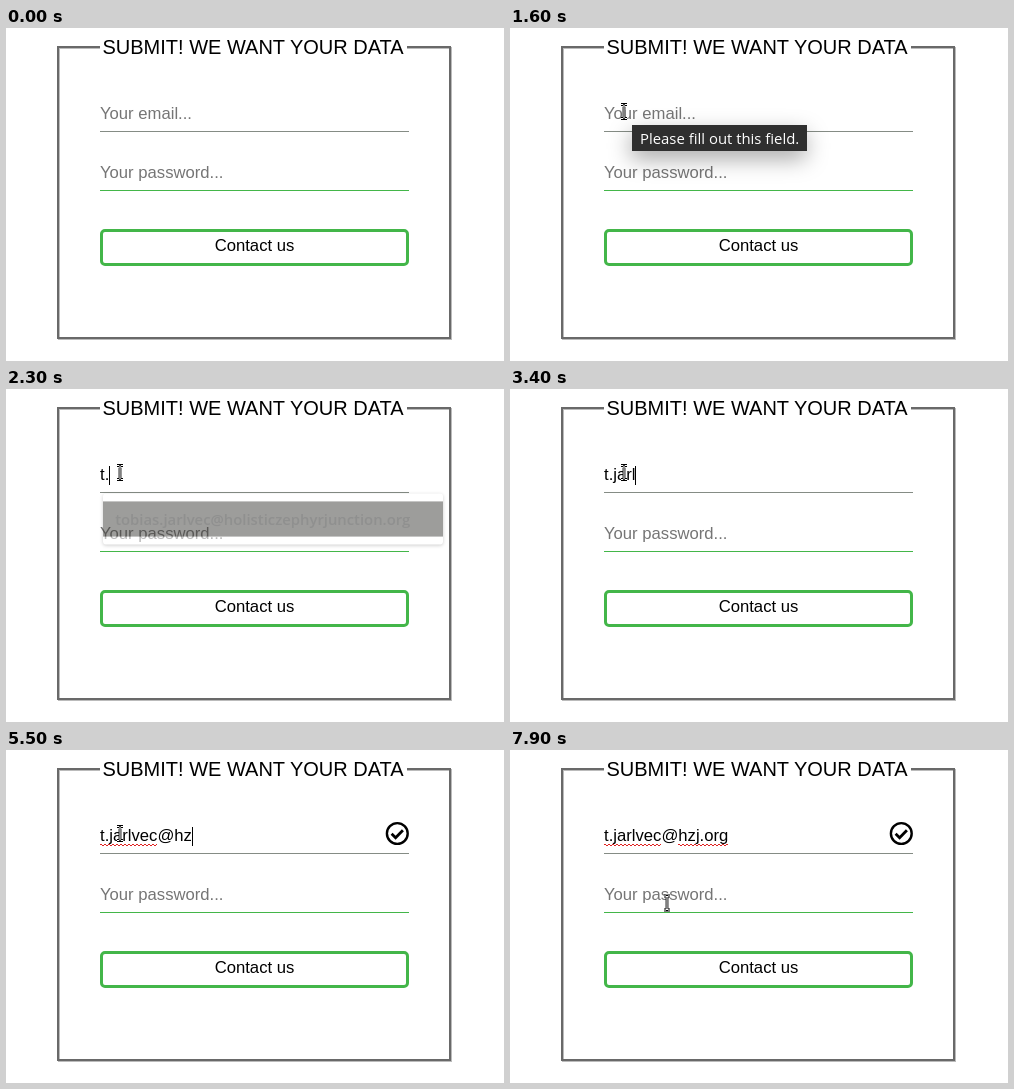
These frames come from a looping animation (498x333 px, 8000 ms). An HTML page:

```html
<!DOCTYPE html>
<html lang="en">
<head>
<meta charset="utf-8">
<title>Form demo</title>
<style>
  html, body { margin: 0; width: 100%; height: 100%; overflow: hidden; background: #fff; }
  #stage { position: relative; width: 498px; height: 333px; overflow: hidden; background: #fff;
    font: 16.667px/20px "Liberation Sans", Arial, sans-serif; color: #000; }
  #stage > * { position: absolute; box-sizing: border-box; white-space: nowrap; }
  .frame { left: 51px; top: 18px; width: 394px; height: 293px; border: 2px solid #696969;
    box-shadow: 1px 1px #bbb, inset 1px 1px #bbb; }
  .legend { left: 94px; top: 7px; width: 307px; padding-left: 2.5px; background: #fff;
    font-size: 20px; line-height: 24px; }
  .field { left: 94px; width: 309px; height: 28px; border-bottom: 1px solid #43b649; }
  .hint { color: #757575; }
  #email { top: 76px; border-color: #858c85; }
  #email .hint { position: absolute; left: 0; }
  #password { top: 135px; }
  .button { left: 94px; top: 201px; width: 309px; height: 37px; padding-top: 4px;
    border: 3px solid #43b649; border-radius: 5px; text-align: center; }
  #caret { position: absolute; top: 1px; width: 1px; height: 19px; background: #000; }
  .word { position: relative; }
  .bad::after { content: ""; position: absolute; left: 0; right: 0; bottom: -1px; height: 2px;
    background: linear-gradient(90deg, #e02020 50%, #0000 0) 0 0 / 4px 1px repeat-x,
                linear-gradient(90deg, #0000 50%, #e02020 0) 0 1px / 4px 1px repeat-x; }
  #tip { left: 122px; top: 97px; width: 175px; height: 26px; padding-left: 8px; background: #2f2f2f;
    color: #fff; font: 14.9px/26px "Open Sans", "Noto Sans", sans-serif;
    box-shadow: -1px 8px 22px rgba(0, 0, 0, .34); }
  #popup { left: 93px; top: 104px; width: 348px; padding: 8px 0; background: #fff;
    border-radius: 3px; box-shadow: 0 1px 4px rgba(0, 0, 0, .4); }
  #popup div { height: 36px; padding-left: 12.5px; background: #3e3d39; color: #222322;
    font: 600 15.2px/36px "Open Sans", "Noto Sans", sans-serif; }
  svg { left: 0; top: 0; overflow: visible; }
  [hidden] { display: none !important; }
</style>
</head>
<body>
<div id="stage">
  <div class="frame"></div>
  <div class="legend">SUBMIT! WE WANT YOUR DATA</div>
  <div class="field" id="email"><span class="hint" id="emailHint">Your email...</span><span class="word" id="user"></span><span id="at"></span><span class="word" id="domain"><span class="word" id="host"></span><span id="suffix"></span></span><span id="caret"></span></div>
  <div class="field hint" id="password">Your password...</div>
  <div class="button">Contact us</div>
  <svg id="check" width="498" height="333" fill="none" stroke="#000" stroke-width="2.4">
    <circle cx="391.3" cy="83.5" r="10.4"/>
    <path d="M385.6 83.8l4 4 7.3-7.5" stroke-width="2.8"/>
  </svg>
  <div id="tip">Please fill out this field.</div>
  <div id="popup">
    <div>tobias.jarlvec@holisticzephyrjunction.org</div>
    <div class="more">office@holisticzephyrjunction.org</div>
    <div class="more">mail@holisticzephyrjunction.org</div>
  </div>
  <svg id="pointer" width="20" height="20">
    <path id="arrow" d="M.5 .5v14l3.2-3 2.2 5 2.3-1-2.2-4.8h4.4z" fill="#fff" stroke="#000"/>
    <g id="beam" fill="none">
      <path d="M-3-7h2L0-6 1-7h2M0-6V6M-3 7h2L0 6 1 7h2" stroke="#000" stroke-width="2.8"/>
      <path d="M-3-7h2L0-6 1-7h2M0-6V6M-3 7h2L0 6 1 7h2" stroke="#fff" stroke-width="1"/>
    </g>
  </svg>
</div>
<script>
const LOOP = 8000, STEP = 100;
const ADDRESS = "t.jarlvec@hzj.org";
const KEY_TIMES = [2000, 2200, 3000, 3100, 3200, 3400, 3500, 3600, 3700,
                   4200, 4800, 5500, 5600, 6000, 6300, 6700, 6900];
const $ = id => document.getElementById(id);
const show = (el, on) => el.toggleAttribute("hidden", !on);
const within = (t, from, to) => t >= from && t < to;
const mix = (a, b, p) => a + (b - a) * p;

function pointerAt(t) {
  if (t < 7500) {
    const p = Math.min(1, (t - 600) / 600), e = 1 - (1 - p) ** 2;
    return [mix(0, 114, e), mix(39, 83.5, e)];
  }
  if (t < 7900) {
    const p = Math.min(1, (t - 7400) / 300);
    return [mix(114, 161, p), mix(83.5, 153, p)];
  }
  return [157, 153];
}

function drawPointer(t) {
  const [x, y] = pointerAt(t);
  const overField = x >= 94 && (within(y, 76, 104) || within(y, 135, 163));
  show($("pointer"), t >= 600);
  show($("beam"), overField);
  show($("arrow"), !overField);
  $("pointer").style.transform = `translate(${x}px, ${y}px)`;
}

function drawEmail(t) {
  const typed = ADDRESS.slice(0, KEY_TIMES.filter(k => k <= t).length);
  $("user").textContent = typed.slice(0, 9);
  $("at").textContent = typed.slice(9, 10);
  $("host").textContent = typed.slice(10, 13);
  $("suffix").textContent = typed.slice(13);
  show($("emailHint"), !typed);
  $("user").classList.toggle("bad", t >= 4200);
  $("host").classList.toggle("bad", within(t, 6000, 7900));
  $("domain").classList.toggle("bad", t >= 7900);
  show($("caret"), within(t, 1800, 7400) && !within(t, 2900, 3000));
  show($("check"), within(t, 4800, 6000) || t >= 6300);
}

function drawOverlays(t) {
  show($("tip"), within(t, 1500, 1800));
  $("tip").style.opacity = t < 1600 ? .5 : 1;

  const fade = Math.max(0, (t - 2100) / 200);
  show($("popup"), within(t, 1800, 2400));
  document.querySelectorAll(".more").forEach(row => show(row, t < 2000));
  $("popup").style.opacity = fade < .5 ? 1 : fade < 1 ? .82 : .5;
  $("popup").style.transform = `scale(${1 - .023 * fade})`;
}

function tick() {
  const t = Math.floor(performance.now() % LOOP / STEP) * STEP;
  drawEmail(t);
  drawOverlays(t);
  drawPointer(t);
  requestAnimationFrame(tick);
}
tick();
</script>
</body>
</html>
```
